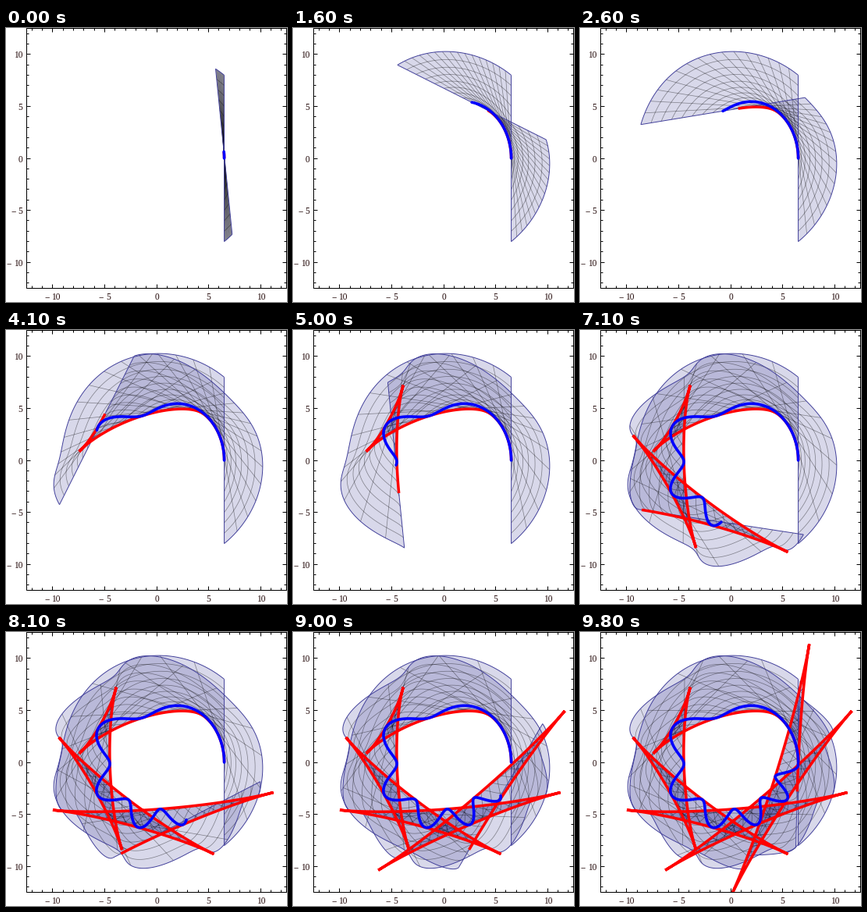
A matplotlib script for the animation above (9900 ms loop, 360x351 px).

```python
import numpy as np
import matplotlib.pyplot as plt
from matplotlib.animation import FuncAnimation
from matplotlib.collections import LineCollection, PolyCollection
from matplotlib.patches import Rectangle

plt.rcParams["path.simplify"] = False
plt.rcParams["path.snap"] = False

W, H = 360, 351
LEFT, TOP, SIDE = 26.5, 0.5, 333
CX, CY, UNIT = LEFT + SIDE / 2, TOP + SIDE / 2, SIDE / 25
HALF = 8          # half length of the moving segment
LEAD = 0.1        # the sweep starts this much before zero
SPIKE = 0.47      # how far mitred joins stick out at cusps
FRAMES = 99
INK = (0.2472, 0.24, 0.6)
TEXT = "#200606"
FONT = 11.5


def to_px(x, y):
    return np.stack([CX + UNIT * x, CY - UNIT * y], axis=-1)


def point(u, v):
    """Point at offset v along the segment for sweep parameter u."""
    a = u + LEAD
    r = 5.5 + np.cos(u ** 2)
    return to_px(r * np.cos(a) - v * np.sin(a), r * np.sin(a) + v * np.cos(a))


def envelope(u):
    """Curve touched by all segments, with spikes at its cusps."""
    s = -2 * u * np.sin(u ** 2)
    speed = 5.5 + np.cos(u ** 2) - 2 * np.sin(u ** 2) - 4 * u ** 2 * np.cos(u ** 2)
    cusp = np.flatnonzero(speed[1:] * speed[:-1] < 0)
    s[cusp] += SPIKE * np.sign(s[cusp])
    return point(u, s)


fig = plt.figure(figsize=(W / 72, H / 72), dpi=72, facecolor="white")
ax = fig.add_axes([0, 0, 1, 1])
ax.set_xlim(0, W)
ax.set_ylim(H, 0)
ax.axis("off")


def draw_label(right, y, value):
    digits = str(abs(value))
    style = dict(ha="right", va="center_baseline", color=TEXT,
                 fontsize=FONT, family="Liberation Serif")
    ax.text(right, y, digits, **style)
    if value < 0:
        ax.text(right - FONT / 2 * len(digits) - 2.7, y, "\u2212", **style)


def draw_frame():
    right, bottom = LEFT + SIDE, TOP + SIDE
    ticks = []
    for n in range(-12, 13):
        size = 5 if n % 5 == 0 else 3
        x = np.floor(CX + UNIT * n) + 0.5
        y = np.floor(CY - UNIT * n) + 0.5
        ticks += [[(x, bottom), (x, bottom - size)], [(x, TOP), (x, TOP + size)],
                  [(LEFT, y), (LEFT + size, y)], [(right, y), (right - size, y)]]
        if n % 5 == 0:
            width = FONT / 2 * len(str(abs(n))) + (9 if n < 0 else 0)
            draw_label(x + width / 2, 343.5, n)
            draw_label(21.5, y, n)
    ax.add_collection(LineCollection(ticks, colors="black", linewidths=1, zorder=8))
    ax.add_patch(Rectangle((LEFT, TOP), SIDE, SIDE, fill=False, ec="black", lw=1, zorder=9))


draw_frame()
window = Rectangle((LEFT, TOP), SIDE, SIDE, transform=ax.transData)

fill = PolyCollection([], facecolors=[INK + (0.2,)], edgecolors="none", zorder=1)
mesh = LineCollection([], colors=[(0, 0, 0, 0.4)], linewidths=0.75, zorder=2)
border = LineCollection([], colors=[INK], linewidths=0.95, zorder=3)
for item in (fill, mesh, border):
    ax.add_collection(item, autolim=False)
red, = ax.plot([], [], color="red", lw=3.5, solid_capstyle="butt",
               solid_joinstyle="bevel", zorder=4)
blue, = ax.plot([], [], color="blue", lw=3.6, solid_capstyle="round",
                solid_joinstyle="round", zorder=5)
for item in (fill, mesh, border, red, blue):
    item.set_clip_path(window)

for item in (*ax.collections, *ax.lines, *ax.patches):
    item.set_snap(False)


def update(k):
    end = 2 * np.pi * k / 100
    u = np.linspace(-LEAD, end, 2 * k + 8)
    a, b = point(u, -HALF), point(u, HALF)
    fill.set_verts(np.stack([a[:-1], b[:-1], b[1:], a[1:]], axis=1))

    fine = np.linspace(-LEAD, end, 12 * k + 30)
    ends = np.array([-HALF, HALF])
    cross = [point(np.full(2, t), ends) for t in np.linspace(-LEAD, end, 17)]
    along = [point(fine, v) for v in range(-HALF, HALF + 1)]
    mesh.set_segments(cross[1:-1] + along[1:-1])
    border.set_segments([cross[0], cross[-1], along[0], along[-1]])

    red.set_data(*envelope(np.linspace(-LEAD, end, 24 * k + 40)).T)
    blue.set_data(*point(fine, 0).T)
    return fill, mesh, border, red, blue


anim = FuncAnimation(fig, update, frames=FRAMES, interval=100,
                     repeat=True, repeat_delay=0, blit=False)
plt.show()
```
